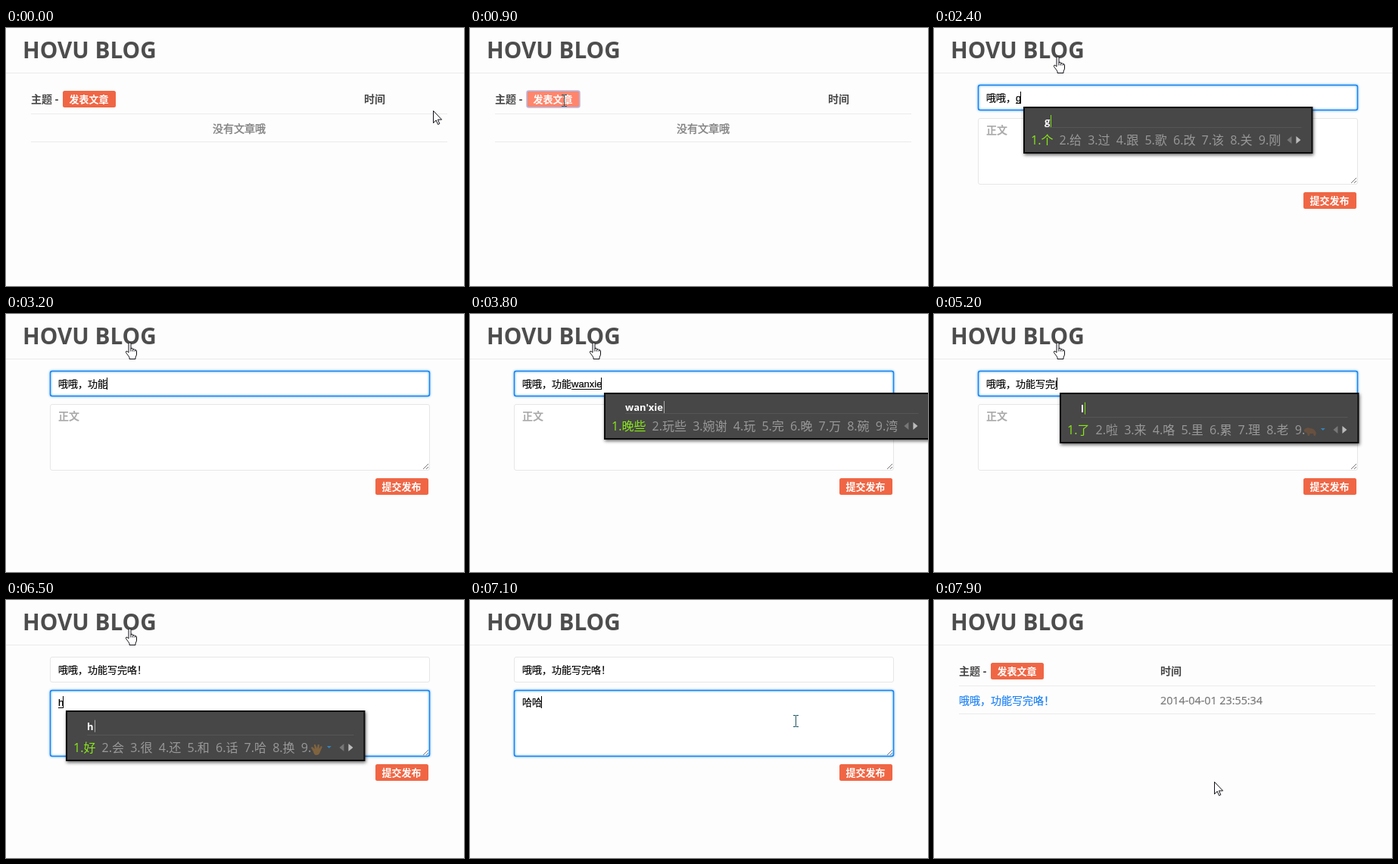
Write an HTML page that moves like this. It is 605 px wide and 341 px high and loops after 8000 ms.

```html
<!DOCTYPE html>
<html lang="zh-CN">
<head>
<meta charset="utf-8">
<title>Blog</title>
<style>
html, body { margin: 0; width: 100%; height: 100%; overflow: hidden; background: #fdfdfd; }
svg { display: block; width: 605px; height: 341px; }
text { font: 14px "Open Sans", "Noto Sans CJK SC", "Noto Sans CJK", sans-serif; white-space: pre; }
.brand { font-size: 29.7px; font-weight: 700; fill: #4d4d4d; }
.rule { stroke: #ebebeb; shape-rendering: crispEdges; }
.head { font-weight: 700; fill: #484848; }
.note { fill: #808080; stroke: #808080; stroke-width: .4; }
.date { font-size: 14.3px; fill: #777; stroke: #777; stroke-width: .2; }
.link { fill: #1a80f5; stroke: #1a80f5; stroke-width: .2; }
.btn rect { fill: #f06645; }
.btn.hover rect { fill: #ff866d; }
.btn.ring rect { stroke: #b4bbe4; stroke-width: 1.5; }
.btn text { font-size: 13px; font-weight: 700; fill: #fff; }
.box { fill: #fff; stroke: #e6e6e6; }
.focus { fill: none; stroke: #1585ee; stroke-width: 1.5; filter: drop-shadow(0 0 1.5px #57aaf8); }
.hint { font-weight: 700; fill: #aaa; }
.typed { font: 13px "Liberation Sans", "Noto Sans CJK SC", "Noto Sans CJK", sans-serif; fill: #000; stroke: #000; stroke-width: .2; }
.panel { fill: #474747; stroke: #0c0c0c; stroke-width: 2; filter: drop-shadow(1px 2px 2px #0009); }
.comp { font-size: 13px; font-weight: 700; fill: #fff; }
.cand { font-size: 16px; fill: #999; }
.cand.first { fill: #88e818; }
.cursor { fill: #fff; stroke: #101018; stroke-linejoin: round; }
</style>
</head>
<body>
<svg viewBox="0 0 605 341">
  <text class="brand" x="22" y="40">HOVU BLOG</text>
  <path class="rule" d="M0 59.5H605"/>

  <g id="list">
    <path class="rule" d="M33 113.5H583M33 150.5H583"/>
    <text class="head" x="33" y="99">主题 -</text>
    <g class="btn" id="post">
      <rect x="75" y="83" width="70" height="22" rx="2.5"/>
      <text x="83.5" y="99">发表文章</text>
    </g>
    <text class="head" id="timeHead" y="99">时间</text>
    <text class="note" id="empty" x="273" y="138">没有文章哦</text>
    <g id="row">
      <text class="link" x="33" y="138">哦哦，功能写完咯！</text>
      <text class="date" x="299" y="138">2014-04-01 23:55:34</text>
    </g>
  </g>

  <g id="form">
    <rect class="box" x="58.5" y="75.5" width="501" height="33" rx="2.5"/>
    <rect class="box" x="58.5" y="119.5" width="501" height="87" rx="2.5"/>
    <path d="M551 205l7-7M555 205l3-3" stroke="#777" fill="none"/>
    <rect class="focus" id="titleFocus" x="58.5" y="75.5" width="501" height="33" rx="2.5"/>
    <rect class="focus" id="bodyFocus" x="58.5" y="119.5" width="501" height="87" rx="2.5"/>
    <text class="hint" id="titleHint" x="69" y="98">标题</text>
    <text class="hint" id="bodyHint" x="69" y="140">正文</text>
    <text class="typed" id="title" x="69" y="97"></text>
    <text class="typed" id="body" x="69" y="140"></text>
    <path id="underline" stroke="#000" shape-rendering="crispEdges"/>
    <path id="caret" stroke="#000" shape-rendering="crispEdges"/>
    <g class="btn" id="submit">
      <rect x="488" y="217" width="70" height="22" rx="2.5"/>
      <text x="496.5" y="233">提交发布</text>
    </g>
    <g id="ime"></g>
  </g>

  <g class="cursor" id="cursors">
    <path id="arrow" d="M.5.5v16l3.7-3.6 2.4 5.6 2.2-1-2.4-5.4h5.2z"/>
    <path id="hand" d="M5 13V2.5a1.5 1.5 0 0 1 3 0V9l.5-1q2 0 2.2 1.5 2-.6 2.6 1 2.2-.3 2.2 1.5v4q0 2-1.5 4v2.5h-8v-2q-1-2-3.5-5-2-2.5-.7-3.3 1.2-.6 3.2 1.8zM8 9v3.5M10.7 9.5v3M13.3 10.5v2"/>
    <path id="beam" fill="none" stroke="#1d5560" d="M-3.5 -7.5h3l.5.5.5-.5h3M0 -7V7M-3.5 7.5h3l.5-.5.5.5h3"/>
  </g>
</svg>

<script>
const LOOP = 8000;
const $ = id => document.getElementById(id);

// time, shape, x, y
const pointer = [
  [0, 'arrow', 564, 109], [100, 'arrow', 328, 204], [200, 'arrow', 139, 163],
  [300, 'arrow', 124, 134], [400, 'hand', 116, 101], [900, 'beam', 124.5, 96],
  [1100, 'beam', 164.5, 92], [1200, 'arrow', 162, 62], [1300, 'hand', 158, 40],
  [1400, 'hand', 157, 37], [7000, 'arrow', 283, 83], [7100, 'beam', 430.5, 160],
  [7200, 'arrow', 552, 253], [7300, 'arrow', 520, 257], [7400, 'arrow', 499, 249],
  [7500, 'hand', 527, 226], [7700, 'arrow', 533, 224], [7800, 'arrow', 518, 236],
  [7900, 'arrow', 370, 240]
];

const W = '万 玩 完 晚 碗 湾 弯 挽 顽';
const WANX = '玩下 万象 晚霞 婉谢 玩 完 晚 万 碗';

// time, committed text, composition, candidates
const typing = [
  [0, ''],
  [1900, '', "o'o", '哦哦 噢噢 哦 噢'],
  [2000, '哦哦'],
  [2200, '哦哦，'],
  [2400, '哦哦，', 'g', '个 给 过 跟 歌 改 该 关 刚'],
  [2500, '哦哦，', 'gon', '共 工 公 功 供 宫 攻 弓 恭'],
  [2600, '哦哦，', "gong'n", '功能 共 工 公 功 供 宫 攻 弓'],
  [2700, '哦哦，功能'],
  [2900, '哦哦，功能', 'w', '我 为 问 无 网 玩 完 位 外'],
  [3000, '哦哦，功能', "wan'x", WANX],
  [3200, '哦哦，功能'],
  [3300, '哦哦，'],
  [3400, '哦哦，', "g'n", '功能 国内 给你 感念 个 给 过 跟 ●'],
  [3500, '哦哦，功能'],
  [3600, '哦哦，功能', 'wan', W],
  [3700, '哦哦，功能', "wan'x", WANX],
  [3800, '哦哦，功能', "wan'xie", '晚些 玩些 婉谢 玩 完 晚 万 碗 湾'],
  [4200, '哦哦，功能', "wan'x", WANX],
  [4300, '哦哦，功能', 'wan', W],
  [4400, '哦哦，功能'],
  [4600, '哦哦，功能', 'x', '想 下 小 学 新 需 些 写 ●'],
  [4700, '哦哦，功能', 'xie', '写 些 谢 鞋 斜 协 血 歇 泻'],
  [4900, '哦哦，功能', "xie'w", '写完 写 些 谢 鞋 斜 协 血 歇'],
  [5000, '哦哦，功能', "xie'wan", '写完 写 些 谢 鞋 斜 协 血 ●'],
  [5100, '哦哦，功能写完'],
  [5200, '哦哦，功能写完', 'l', '了 啦 来 咯 里 累 理 老 ●'],
  [5300, '哦哦，功能写完咯'],
  [5600, '哦哦，功能写完咯！'],
  [5800, ''],
  [6500, '', 'h', '好 会 很 还 和 话 哈 换 ✋'],
  [6600, '', 'ha', '哈 蛤 铪 虾 呵 好 会 很 还'],
  [6700, '', "ha'ha", '哈哈 蛤蛤 哈蛤 呵哈 哈 蛤 铪 虾 ✋'],
  [6800, '哈哈']
];

const at = (rows, t) => rows.findLast(r => r[0] <= t);
const show = (id, on) => $(id).style.display = on ? '' : 'none';
const tag = (name, attrs, body = '') =>
  `<${name} ${Object.entries(attrs).map(([k, v]) => `${k}="${v}"`).join(' ')}>${body}</${name}>`;

function icon(kind, x, y) {
  return kind === '✋'
    ? tag('path', { d: `M${x + 4} ${y + 8}l-3-5 2-1 3 3-1-6 2 0 2 5 1-5 2 0 0 6 2-4 2 1-3 7q-1 4-5 4-3 0-4-5z`, fill: '#80633f' })
    : tag('path', { d: `M${x} ${y + 3}q3-4 8-2 6 0 8 6l-1 4h-2l-1-3-4 0-1 3h-2l-1-4q-4 0-4-4z`, fill: '#68503f' });
}

function drawIme(x, y, comp, cands, t) {
  const items = cands.split(' ');
  const picture = /[●✋]/.test(cands);
  const tall = picture ? 5 : 0;
  const extra = items.join('').length - items.length;
  const w = 44 + items.length * 37.6 + extra * 16 + (picture ? 13 : 0);
  const base = y + 50 + tall;
  let html = tag('rect', { class: 'panel', x: x + 1, y: y + 1, width: w - 2, height: 60 + tall });
  html += tag('text', { class: 'comp', x: x + 28, y: y + 24 + tall / 3 }, comp);
  html += tag('path', { d: `M${x + 28} ${y + 27.5 + tall}H${x + w - 15}`, stroke: '#565656' });

  let cx = x + 10;
  items.forEach((word, i) => {
    const pic = /[●✋]/.test(word);
    html += tag('text', { class: i ? 'cand' : 'cand first', x: cx, y: base }, `${i + 1}.${pic ? '' : word}`);
    if (pic) {
      html += icon(word, cx + 12, base - 9);
      html += tag('path', { d: `M${cx + 34} ${base - 8}h6l-3 3z`, fill: '#3385b8' });
    }
    cx += 37.6 + (word.length - 1) * 16;
  });

  const mid = base - 6;
  html += tag('path', { d: `M${x + w - 28} ${mid - 5}v10l-6-5z`, fill: '#777' });
  html += tag('path', { d: `M${x + w - 22} ${mid - 5}v10l6-5z`, fill: '#bbb' });
  $('ime').innerHTML = html;

  const end = Math.round(x + 29 + $('ime').querySelector('.comp').getComputedTextLength()) + .5;
  const color = t / 100 % 4 ? '#aaa' : '#7be015';
  $('ime').innerHTML += tag('path', { d: `M${end} ${y + 11 + tall / 3}v16`, stroke: color });
}

function drawField(t) {
  const inBody = t >= 5800;
  const [, text, comp = '', cands] = at(typing, t);
  const keys = comp.replaceAll("'", '');
  const field = $(inBody ? 'body' : 'title');
  const y = inBody ? 135 : 92;

  $('title').textContent = inBody ? '哦哦，功能写完咯！' : '';
  $('body').textContent = '';
  field.textContent = text;
  const start = 69 + (text ? field.getComputedTextLength() : 0);
  field.textContent = text + keys;
  const end = 69 + (text + keys ? field.getComputedTextLength() : 0);

  const caretX = Math.round(end) - .5;
  $('caret').setAttribute('d', `M${caretX} ${y - 8}v16`);
  $('underline').setAttribute('d', keys ? `M${start} ${y + 7.5}H${end}` : '');
  show('titleHint', !$('title').textContent);
  show('bodyHint', !$('body').textContent);

  const shift = Math.max(0, Math.min(1, (t - 5700) / 300));
  $('titleFocus').style.opacity = 1 - shift;
  $('bodyFocus').style.opacity = shift;

  if (keys) drawIme(Math.round(end) + 3, inBody ? 146 : 104, comp, cands, t);
  else $('ime').innerHTML = '';
}

function draw(t) {
  const done = t >= 7700;
  const editing = t >= 1000 && !done;
  show('form', editing);
  show('list', !editing);
  show('row', done);
  show('empty', !done);
  $('timeHead').setAttribute('x', done ? 299 : 473);
  $('post').classList.toggle('hover', t >= 400 && !done);
  $('post').classList.toggle('ring', t >= 900 && !done);
  $('submit').classList.toggle('hover', t >= 7500);
  if (editing) drawField(t);

  const [, shape, x, y] = at(pointer, t);
  for (const id of ['arrow', 'hand', 'beam']) show(id, id === shape);
  $('cursors').setAttribute('transform', `translate(${x} ${y})`);
}

let last = -1;
const begin = performance.now();
function tick() {
  const t = Math.floor((performance.now() - begin) % LOOP / 100) * 100;
  if (t !== last) draw(last = t);
  requestAnimationFrame(tick);
}
tick();
</script>
</body>
</html>
```
